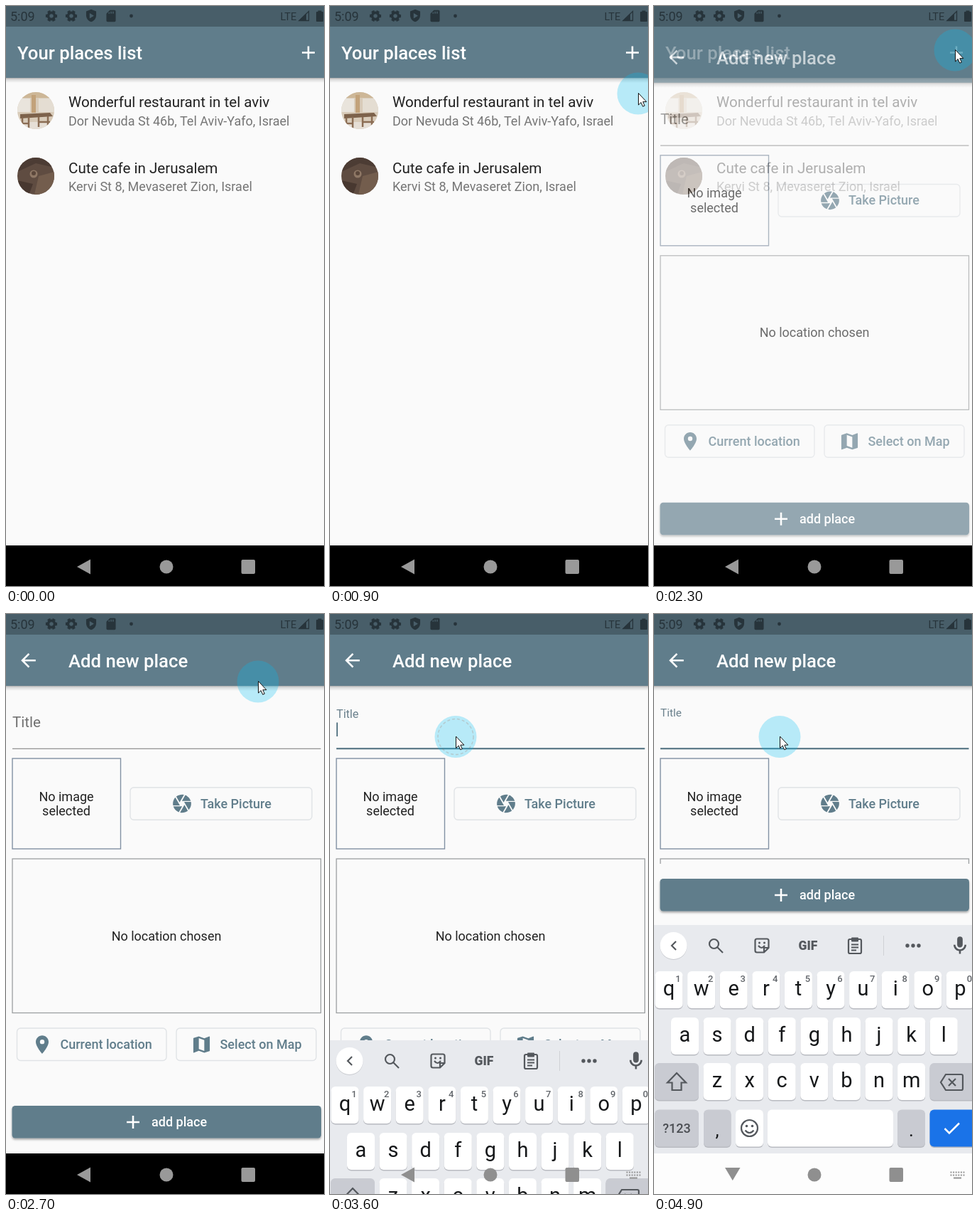
Recreate the animation shown at these times as an HTML page. Size 448 px wide and 815 px high, loop 5.1 s.

```html
<!DOCTYPE html>
<html lang="en">
<head>
<meta charset="utf-8">
<title>Places app</title>
<style>
  html, body { margin: 0; width: 100%; height: 100%; overflow: hidden; background: #fafafa; }
  svg { display: block; width: 448px; height: 815px; font-family: Roboto, sans-serif; }
  .heading { font-size: 25.7px; font-weight: 500; fill: #fff; }
  .item { font-size: 20.6px; fill: #212121; }
  .sub { font-size: 18px; fill: #757575; }
  .body { font-size: 18px; fill: #222; }
  .button { font-size: 18px; font-weight: 500; fill: #607d8b; }
  .mid { text-anchor: middle; }
  .outline { fill: none; stroke: #e0e3e6; stroke-width: 1.4; }
  .line { fill: none; stroke: #54585d; stroke-width: 2.2; }
</style>
</head>
<body>
<svg id="stage" viewBox="0 0 448 815"></svg>
<script>
const LOOP = 5100, STEP = 100;
const BLUE_GREY = '#607d8b', INK = '#54585d', DARK = '#27343b';

const ICONS = {
  back: 'M20 11H7.83l5.59-5.59L12 4l-8 8 8 8 1.41-1.41L7.83 13H20z',
  plus: 'M19 13h-6v6h-2v-6H5v-2h6V5h2v6h6z',
  shutter: 'M9.4 10.5l4.77-8.26C13.47 2.09 12.75 2 12 2c-2.4 0-4.6.85-6.32 2.25l3.66 6.35zM21.54 9c-.92-2.92-3.15-5.26-6-6.34L11.88 9zm.26 1h-7.49l5.05 8.75C21 16.97 22 14.61 22 12c0-.69-.07-1.35-.2-2zM8.54 12l-3.9-6.75C3.01 7.03 2 9.39 2 12c0 .69.07 1.35.2 2h7.49zm-6.08 3c.92 2.92 3.15 5.26 6 6.34L12.12 15zm11.27 0l-3.9 6.76c.7.15 1.42.24 2.17.24 2.4 0 4.6-.85 6.32-2.25l-3.66-6.35z',
  pin: 'M12 2C8.13 2 5 5.13 5 9c0 5.25 7 13 7 13s7-7.75 7-13c0-3.87-3.13-7-7-7zm0 9.5a2.5 2.5 0 0 1 0-5 2.5 2.5 0 0 1 0 5z',
  map: 'M20.5 3L15 5.1 9 3 3.36 4.9Q3 5 3 5.4V20.5q0 .5.5.5L9 18.9l6 2.1 5.64-1.9q.36-.1.36-.5V3.5q0-.5-.5-.5zM15 19l-6-2.11V5l6 2.11z',
  mic: 'M12 14c1.66 0 3-1.34 3-3V5a3 3 0 0 0-6 0v6c0 1.66 1.34 3 3 3zm5-3a5 5 0 0 1-10 0H5c0 3.53 2.61 6.43 6 6.92V21h2v-3.08c3.39-.49 6-3.39 6-6.92z',
  shield: 'M12 1.5L4 4.5v6.5c0 5 3.4 9.3 8 10.5 4.600-1.2 8-5.500 8-10.500V4.500zM9.500 7.500l7 4.200-7 4.200z',
  card: 'M18 2h-8L4 8v12q0 2 2 2h12q2 0 2-2V4q0-2-2-2zM9.500 8h-1.800V5.500h1.800zm3.500 0h-1.800V4.500H13zm3.500 0h-1.800V4.500h1.800z'
};

const text = (cls, x, y, s) => `<text class="${cls}" x="${x}" y="${y}">${s}</text>`;
const rect = (x, y, w, h, fill, extra = '') =>
  `<rect x="${x}" y="${y}" width="${w}" height="${h}" fill="${fill}" ${extra}/>`;
const circle = (x, y, r, fill, extra = '') => `<circle cx="${x}" cy="${y}" r="${r}" fill="${fill}" ${extra}/>`;
const path = (d, fill, extra = '') => `<path d="${d}" fill="${fill}" ${extra}/>`;
const icon = (name, x, y, fill, scale = 1.286) =>
  path(ICONS[name], fill, `fill-rule="evenodd" transform="translate(${x} ${y}) scale(${scale}) translate(-12 -12)"`);

const appBar = () => rect(0, 100, 448, 8, 'url(#shade)') + rect(0, 0, 448, 101, BLUE_GREY);

const gear = x => `<g fill="none" stroke="${DARK}" transform="translate(${x} 14)">
  <circle r="4.600" stroke-width="3.600"/>
  <circle r="6.800" stroke-width="2.600" pathLength="12" stroke-dasharray="1.150 .85" stroke-dashoffset=".57"/></g>`;

function listPage() {
  const dining = rect(16, 121, 52, 52, '#d8cbb9') + rect(16, 121, 52, 8, '#cdb797') +
    rect(16, 130, 18, 19, '#e9e4dc') + rect(46, 130, 22, 19, '#e4ddd2') + rect(36, 125, 6, 25, '#c2a27a') +
    rect(16, 163, 52, 12, '#e6dfd6') + path('M20 152l42-2 4 5-46 3z', '#7d624b') +
    path('M23 157v13M32 156v17M46 156v14M59 155v15M18 165h14M46 163h16', 'none', 'stroke="#8b6d54" stroke-width="2.500"');
  const cafe = rect(16, 213, 52, 52, '#5f4c41') + path('M16 213h52v14l-26-6-26 12z', '#4c3c34') +
    path('M46 239l22-6v32H40z', '#735d4d') + path('M16 245l22 5-6 16H16z', '#483830') +
    circle(39, 236, 5.5, '#8f7866') + circle(39, 235, 3, '#5b473b');
  return rect(0, 0, 448, 815, '#fafafa') + appBar() +
    text('heading', 16, 75, 'Your places list') + icon('plus', 426, 65.5, '#fff') +
    `<g clip-path="url(#avatarA)">${dining}</g><g clip-path="url(#avatarB)">${cafe}</g>` +
    text('item', 88, 142, 'Wonderful restaurant in tel aviv') +
    text('sub', 88, 167.5, 'Dor Nevuda St 46b, Tel Aviv-Yafo, Israel') +
    text('item', 88, 234.5, 'Cute cafe in Jerusalem') +
    text('sub', 88, 260, 'Kervi St 8, Mevaseret Zion, Israel');
}

function formPage() {
  const outlined = (x, y, w) => `<rect class="outline" x="${x}" y="${y}" width="${w}" height="45.500" rx="5"/>`;
  const fields = `<text id="label" x="9">Title</text>` +
    rect(9, 188.7, 434.5, 1.2, '#8c8c8c', 'id="underline"') + rect(9, 152.5, 2, 19.5, BLUE_GREY, 'id="caret"') +
    rect(9, 203, 152.5, 127, 'none', 'stroke="#8291a3" stroke-width="1.400"') +
    text('body mid', 85, 262.5, 'No image') + text('body mid', 85, 283, 'selected') +
    outlined(175, 243.7, 256) + icon('shutter', 248, 266.5, BLUE_GREY) + text('button', 274, 272.7, 'Take Picture') +
    rect(9, 344, 434.5, 216.5, 'none', 'stroke="#9c9fa1" stroke-width="1.300"') +
    text('body mid', 226, 458.5, 'No location chosen') +
    outlined(15.5, 582, 210.5) + icon('pin', 51, 605, BLUE_GREY) + text('button', 76.5, 611, 'Current location') +
    outlined(240, 582, 197) + icon('map', 275.5, 605, BLUE_GREY) + text('button', 301.5, 611, 'Select on Map');
  const add = rect(8.5, 691, 435.5, 45.5, BLUE_GREY, 'rx="4.500" filter="url(#lift)"') +
    icon('plus', 179, 714, '#fff') + `<text class="button" x="205" y="720" style="fill:#fff">add place</text>`;
  return rect(0, 0, 448, 830, '#fafafa') + appBar() + icon('back', 31.5, 65.3, '#fff') +
    text('heading', 88, 75, 'Add new place') +
    `<g clip-path="url(#scroll)">${fields}</g><g id="add">${add}</g>`;
}

function keyboard() {
  const key = (x, y, w, fill = '#fff') => rect(x, y + 1.5, w, 52, '#b9bbc1', 'rx="6"') + rect(x, y, w, 52, fill, 'rx="6"');
  const label = (x, y, s, size = 29, fill = '#16181a', weight = 400) =>
    `<text class="mid" x="${x}" y="${y}" font-size="${size}" fill="${fill}" font-weight="${weight}">${s}</text>`;
  const row = (letters, x, y, digits) => [...letters].map((c, i) => {
    const cx = x + i * 45.6;
    return key(cx - 19.5, y, 39) + label(cx, y + 34, c) +
      (digits ? label(cx + 13, y + 14.5, (i + 1) % 10, 13, '#62666b', 500) : '');
  }).join('');
  const line = d => `<path class="line" d="${d}"/>`;
  const GREY = '#c9cbd2';

  const tools = circle(27.5, 467, 19, '#c9cbd0') + circle(27.5, 466, 19, '#fff') + line('M31 460l-6 6 6 6') +
    `<circle class="line" cx="84.500" cy="463.500" r="6.500"/>` + line('M89 468l8 8') +
    line('M155 475.500H145q-2.500 0-2.500-2.500V459q0-2.500 2.500-2.500h14q2.500 0 2.500 2.500v10zM155 475v-6h6M147 466q4.500 6 9 0') +
    circle(148.5, 462, 1.5, INK) + circle(155.5, 462, 1.5, INK) +
    label(217, 472, 'GIF', 17.5, INK, 900) +
    `<rect class="line" x="274" y="457" width="18" height="20" rx="2"/>` + rect(278, 454.5, 10, 6, INK, 'rx="1"') +
    line('M278 464.500h10M278 468.500h10M278 472.500h7') +
    rect(323, 452, 1, 28, '#cfd1d6') + [357, 365, 373].map(x => circle(x, 466, 2.7, INK)).join('') +
    icon('mic', 431, 466, INK);

  const controls = key(1, 631, 62, GREY) + line('M32 645l-13 13.500h6.500V669h13v-10.500H45z') +
    key(388.5, 631, 66, GREY) + line('M411 647h22q2 0 2 2v18q0 2-2 2h-22l-7-11zM415 653l10 10M425 653l-10 10') +
    key(1, 696.5, 62, GREY) + label(32, 729, '?123', 18, '#4b4e53', 500) +
    key(70, 696.5, 38.5, GREY) + label(89, 734, ',', 26) +
    key(115, 696.5, 39) + `<circle class="line" cx="134.500" cy="722.500" r="11.500"/>` +
    circle(130.5, 719.5, 1.8, INK) + circle(138.5, 719.5, 1.8, INK) + line('M128.500 725.500q6 7 12 0') +
    key(160, 696.5, 177) + key(343, 696.5, 39, GREY) + label(362.5, 734, '.', 26) +
    key(388.5, 696.5, 66, '#1a73e8') + path('M409.500 723l6.500 6.500 14-14', 'none', 'stroke="#fff" stroke-width="2.500"');

  return rect(0, 437, 448, 321, '#e8eaee') + rect(0, 758, 448, 400, '#fdfdfd') + tools +
    row('qwertyuiop', 21, 502, true) + row('asdfghjkl', 43.5, 567) + row('zxcvbnm', 89, 631) + controls;
}

function systemBars() {
  const dots = [783.5, 787.5].map(y =>
    [0, 1, 2, 3, 4, 5].map(i => rect(417.5 + i * 3.6, y, 2, 2, '#949494')).join('')).join('');
  return rect(0, 758, 448, 57, '#000', 'id="navBack"') +
    `<g id="navIcons"><path id="navArrow"/>${circle(226, 788, 9.5, 'inherit', 'style="fill:inherit"')}
     <rect x="331.500" y="778" width="19.500" height="20" rx="2"/></g>` +
    `<g id="navKeys">${dots}${rect(422, 791.5, 11, 2, '#949494')}</g>` +
    rect(0, 0, 448, 29, '#485e69') +
    `<text x="6" y="20.500" font-size="18" fill="${DARK}">5:09</text>` + gear(64) + gear(92) +
    icon('shield', 120, 14, DARK, 0.88) + icon('card', 148, 14, DARK, 0.82) + circle(176.5, 14, 2.4, DARK) +
    `<text x="386.500" y="19.500" font-size="14.500" fill="${DARK}">LTE</text>` +
    path('M413 20.500h13.500V7.500z', 'none', `stroke="${DARK}" stroke-width="1.300"`) + path('M412 21h11V10.500z', DARK) +
    path('M437 9q0-1 1-1h1.500V6.500h5V8h1.500q1 0 1 1v12q0 1-1 1h-8q-1 0-1-1z', DARK);
}

const cursor = `<g id="cursor">${circle(0, 0, 29.5, 'rgba(0,188,240,.27)')}
  <circle id="ring" fill="#a85a3c" stroke="#a85a3c" stroke-width="1.500" stroke-dasharray="4 3"/>
  ${path('M.5-.5V16l3.700-3.500 2.500 5.700 2.600-1.100-2.500-5.500h5.100z', '#fff', 'stroke="#111" stroke-width="1"')}</g>`;

document.getElementById('stage').innerHTML = `<defs>
  <linearGradient id="shade" x2="0" y2="1"><stop stop-opacity=".38"/><stop offset=".4" stop-opacity=".13"/><stop offset="1" stop-opacity="0"/></linearGradient>
  <filter id="lift" x="-5%" width="110%" y="-20%" height="150%"><feDropShadow dx="0" dy="2" stdDeviation="1.500" flood-opacity=".35"/></filter>
  <clipPath id="avatarA"><circle cx="42" cy="147" r="26"/></clipPath>
  <clipPath id="avatarB"><circle cx="42" cy="239" r="26"/></clipPath>
  <clipPath id="scroll"><rect id="scrollBox" y="101" width="448"/></clipPath></defs>
  ${listPage()}<g id="form">${formPage()}</g><g id="keyboard">${keyboard()}</g>${systemBars()}${cursor}`;

const el = id => document.getElementById(id);
const set = (id, attrs) => { for (const name in attrs) el(id).setAttribute(name, attrs[name]); };
const show = (id, on) => { el(id).style.display = on ? '' : 'none'; };
const clamp = v => Math.min(1, Math.max(0, v));

// Rows are [time, ...values], joined by straight lines.
function track(rows, t) {
  const i = rows.findIndex(r => r[0] > t);
  if (i === 0) return rows[0].slice(1);
  if (i < 0) return rows[rows.length - 1].slice(1);
  const a = rows[i - 1], b = rows[i], k = (t - a[0]) / (b[0] - a[0]);
  return a.slice(1).map((v, n) => v + (b[n + 1] - v) * k);
}

const POINTER = [[500, 285, 434], [600, 326, 350], [800, 416, 165], [900, 434, 123], [1000, 430, 102],
  [1100, 426, 76], [1300, 424, 62], [2500, 424, 62], [2600, 406, 69], [2700, 355, 95],
  [2900, 228, 152], [3000, 192, 167], [3100, 181, 171], [3200, 177, 172.5]];
const KEYBOARD = [[3400, 400], [3500, 312], [3600, 162], [3700, 22], [3800, 4], [3900, 0]];
const CLICKS = [1900, 3300];

function draw(t) {
  const open = clamp((t - 2066) / 300);
  set('form', { opacity: open ** 1.7, transform: `translate(0 ${190 * (1 - open) ** 2.2})` });

  const focused = t >= 3500, resized = t >= 3800;
  const lifted = clamp((t - 3430) / 200);
  set('label', { y: 159 - 15.5 * lifted, 'font-size': 20.6 - 5.2 * lifted, fill: focused ? '#6a808c' : '#707070' });
  set('underline', focused ? { y: 188, height: 2.3, fill: BLUE_GREY } : { y: 188.7, height: 1.2, fill: '#8c8c8c' });
  show('caret', t >= 3400 && Math.floor((t - 3400) / 500) % 2 === 0);
  set('scrollBox', { height: resized ? 250 : 571 });
  set('add', { transform: `translate(0 ${resized ? -319 : 0})` });

  set('keyboard', { transform: `translate(0 ${track(KEYBOARD, t)[0]})` });
  show('keyboard', focused);
  show('navBack', !focused);
  show('navKeys', focused);
  set('navIcons', { fill: focused ? '#8f8f8f' : '#999' });
  set('navArrow', { d: resized ? 'M100 778h21.500l-10.750 18z' : 'M100 788l19-10.500v21z' });

  const [x, y] = track(POINTER, t);
  set('cursor', { transform: `translate(${x} ${y})` });
  show('cursor', t >= 500);
  const age = CLICKS.map(c => (t - c) / STEP).find(a => a >= 0 && a < 4);
  show('ring', age !== undefined);
  if (age !== undefined) set('ring', { r: 7 + 6 * age, opacity: 0.85 - 0.21 * age, 'fill-opacity': age < 1 ? 0.8 : 0 });
}

const start = performance.now();
function tick() {
  const t = (performance.now() - start) % LOOP;
  draw(Math.floor(t / STEP) * STEP);
  requestAnimationFrame(tick);
}
tick();
</script>
</body>
</html>
```
